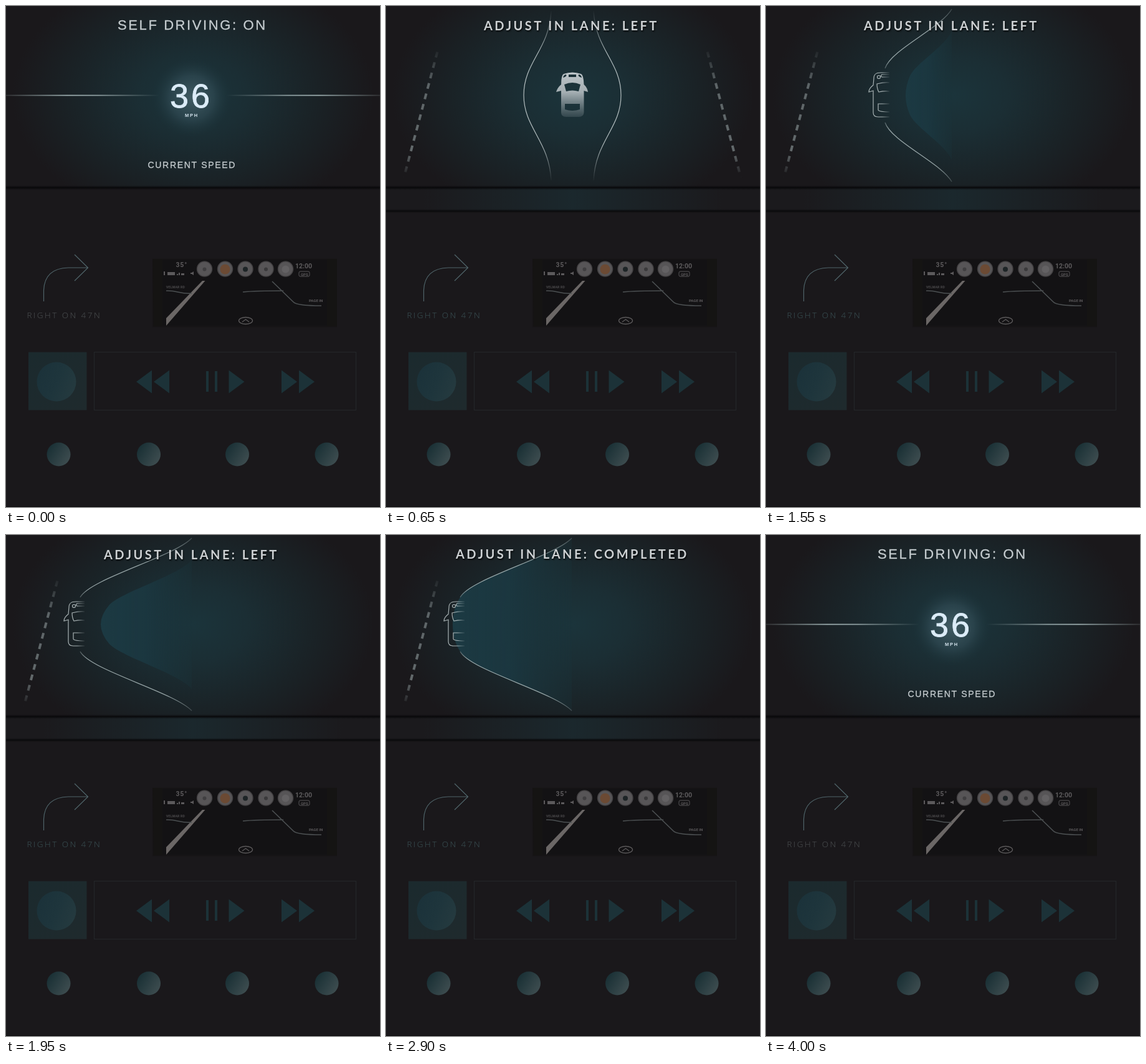
An HTML page for the animation above (4.05 s loop, 600 by 804 pixels).

```html
<!DOCTYPE html>
<html lang="en">
<head>
<meta charset="utf-8">
<title>Dashboard</title>
<style>
html, body { margin: 0; width: 100%; height: 100%; overflow: hidden; background: #1a181b; }
svg { display: block; width: 100vw; height: 100vh; }
.sans { font-family: "Liberation Sans", Arial, sans-serif; fill: #c6cdd0; stroke: #c6cdd0; stroke-width: .3; }
.title { font: 700 20px Lato, sans-serif; letter-spacing: 3.45px; fill: #cdd1d3; filter: drop-shadow(1px 2px 1px #000b); }
.turn { font: 300 13.5px "Open Sans", sans-serif; letter-spacing: 2.45px; }
.tiny { font-family: Roboto, sans-serif; font-weight: 700; fill: #5c5a5c; }
.line { fill: none; }
</style>
</head>
<body>
<svg viewBox="0 0 600 804">
  <defs>
    <radialGradient id="panel" gradientUnits="userSpaceOnUse" cx="0" cy="0" r="1" gradientTransform="translate(300 143) scale(290 205)">
      <stop offset="0" stop-color="#1b343b"/>
      <stop offset=".3" stop-color="#1b2e34"/>
      <stop offset=".65" stop-color="#1a2327"/>
      <stop offset="1" stop-color="#1a181b"/>
    </radialGradient>
    <radialGradient id="glow">
      <stop offset="0" stop-color="#48636b" stop-opacity=".85"/>
      <stop offset=".55" stop-color="#35505a" stop-opacity=".55"/>
      <stop offset="1" stop-color="#1b343b" stop-opacity="0"/>
    </radialGradient>
    <linearGradient id="beam">
      <stop offset="0" stop-color="#b9cccd" stop-opacity=".15"/>
      <stop offset=".4" stop-color="#b9cccd" stop-opacity=".85"/>
      <stop offset=".6" stop-color="#b9cccd" stop-opacity=".75"/>
      <stop offset="1" stop-color="#b9cccd" stop-opacity="0"/>
    </linearGradient>
    <linearGradient id="strip">
      <stop offset=".1" stop-color="#1b1a1d"/>
      <stop offset=".5" stop-color="#1b282d"/>
      <stop offset=".9" stop-color="#1b1a1d"/>
    </linearGradient>
    <linearGradient id="seam" x2="0" y2="1">
      <stop offset="0" stop-color="#08080a" stop-opacity="0"/>
      <stop offset=".5" stop-color="#08080a" stop-opacity=".9"/>
      <stop offset="1" stop-color="#08080a" stop-opacity="0"/>
    </linearGradient>
    <linearGradient id="dashes" gradientUnits="userSpaceOnUse" x1="0" y1="64" x2="0" y2="276">
      <stop offset="0" stop-color="#757e80" stop-opacity="0"/>
      <stop offset=".3" stop-color="#757e80" stop-opacity=".75"/>
      <stop offset=".8" stop-color="#757e80" stop-opacity=".8"/>
      <stop offset="1" stop-color="#757e80" stop-opacity="0"/>
    </linearGradient>
    <linearGradient id="bottle" gradientUnits="userSpaceOnUse" x1="0" y1="6" x2="0" y2="282">
      <stop offset="0" stop-color="#c3cdce" stop-opacity="0"/>
      <stop offset=".25" stop-color="#c3cdce" stop-opacity=".9"/>
      <stop offset=".78" stop-color="#c3cdce" stop-opacity=".9"/>
      <stop offset="1" stop-color="#c3cdce" stop-opacity="0"/>
    </linearGradient>
    <linearGradient id="sweep" gradientUnits="userSpaceOnUse" x1="0" y1="3" x2="0" y2="284">
      <stop offset="0" stop-color="#b5c4c5" stop-opacity=".2"/>
      <stop offset=".13" stop-color="#b5c4c5" stop-opacity=".8"/>
      <stop offset=".3" stop-color="#b5c4c5" stop-opacity=".8"/>
      <stop offset=".35" stop-color="#b5c4c5" stop-opacity=".3"/>
      <stop offset=".65" stop-color="#b5c4c5" stop-opacity=".3"/>
      <stop offset=".7" stop-color="#b5c4c5" stop-opacity=".8"/>
      <stop offset=".9" stop-color="#b5c4c5" stop-opacity=".8"/>
      <stop offset="1" stop-color="#b5c4c5" stop-opacity=".2"/>
    </linearGradient>
    <linearGradient id="body" gradientUnits="userSpaceOnUse" x1="0" y1="106" x2="0" y2="179">
      <stop offset="0" stop-color="#bcc4c8"/>
      <stop offset=".45" stop-color="#a4aeb2"/>
      <stop offset="1" stop-color="#8b989d" stop-opacity=".2"/>
    </linearGradient>
    <linearGradient id="edge" gradientUnits="userSpaceOnUse" x1="273" y1="0" x2="308" y2="0">
      <stop offset=".6" stop-color="#c3cdce" stop-opacity=".85"/>
      <stop offset="1" stop-color="#c3cdce" stop-opacity="0"/>
    </linearGradient>
    <linearGradient id="fill">
      <stop offset="0" stop-color="#1c3a43"/>
      <stop offset=".5" stop-color="#1b3740" stop-opacity=".95"/>
      <stop offset="1" stop-color="#1b343b" stop-opacity=".3"/>
    </linearGradient>
    <linearGradient id="knob" x1=".1" y1=".25" x2=".95" y2=".8">
      <stop offset="0" stop-color="#1b3136"/>
      <stop offset="1" stop-color="#3e4d50"/>
    </linearGradient>
    <linearGradient id="cover" x2="1" y2="1">
      <stop offset="0" stop-color="#1b2a2e"/>
      <stop offset="1" stop-color="#1f2a2d"/>
    </linearGradient>
    <linearGradient id="disc" y1=".3" x2="1" y2=".7">
      <stop offset="0" stop-color="#1b323a"/>
      <stop offset=".5" stop-color="#1e353c"/>
      <stop offset="1" stop-color="#253a3f"/>
    </linearGradient>
  </defs>

  <rect width="600" height="804" fill="#1a181b"/>
  <rect width="600" height="291" fill="url(#panel)"/>

  <g id="speed">
    <circle cx="298" cy="147" r="64" fill="url(#glow)"/>
    <rect y="142.6" width="246" height="1.7" fill="url(#beam)"/>
    <rect y="142.6" width="246" height="1.7" fill="url(#beam)" transform="matrix(-1 0 0 1 600 0)"/>
    <g class="sans">
      <text x="179" y="38" font-size="22" letter-spacing="2.6">SELF DRIVING: ON</text>
      <text x="263" y="163" font-size="54" letter-spacing="4" style="fill:#dcecf8;stroke:#dcecf8;stroke-width:.8">36</text>
      <text x="287" y="177.5" font-size="7.5" font-weight="700" letter-spacing="1.8" style="fill:#d3e2ec;stroke:none">MPH</text>
      <text x="227.5" y="259.5" font-size="14" letter-spacing="1.7">CURRENT SPEED</text>
    </g>
  </g>

  <g id="lane">
    <rect y="292" width="600" height="37" fill="url(#strip)"/>
    <rect y="326" width="600" height="6" fill="url(#seam)"/>
    <path id="leftDashes" class="line" d="M28 278L85.5 62" stroke="url(#dashes)" stroke-width="4" stroke-dasharray="9.3 8" stroke-dashoffset="5.4"/>
    <g id="both">
      <use href="#leftDashes" transform="matrix(-1 0 0 1 598 0)"/>
      <path id="side" class="line" d="M265 8C262 70 221 90 221 143S262 216 265 280" stroke="url(#bottle)" stroke-width="1.2"/>
      <use href="#side" transform="matrix(-1 0 0 1 598 0)"/>
      <path fill="url(#body)" fill-rule="evenodd" d="M285 109Q299 104 313 109Q317 111 317.5 126Q323 131 324 138L317.5 136V171Q317 178 309 178H289Q281 178 281 171V136L273 138Q275 131 281 126Q281 111 285 109Z
        M286 126Q299 120 312 126L309 137Q299 134 289 137Z
        M287 157H311V166Q299 170 287 166Z
        M284 115Q285 110 289 110Q291 113 284 115Z M314 115Q313 110 309 110Q307 113 314 115Z
        M293 110H305V114H293Z"/>
    </g>
    <g id="half">
      <path id="blob" fill="url(#fill)"/>
      <path id="curve" class="line" stroke="url(#sweep)" stroke-width="1.3"/>
      <path id="car" class="line" stroke="url(#edge)" stroke-width="1.2" d="M306 107H292C285 107 281 109 281 116L280 127C276 130 273 134 273 138L280 136V171C280 176 283 178 288 178H306
        M306 110H294Q291 112 294 114H306
        M291.5 114A2.5 2.5 0 1 1 286.500 114A2.5 2.5 0 1 1 291.5 114
        M306 123C298 122 290 124 286 125Q286 133 289 138Q298 136 306 137
        M306 157H288V167Q290 170 306 170"/>
    </g>
    <text id="toLeft" class="title" x="157" y="39">ADJUST IN LANE: LEFT</text>
    <text id="done" class="title" x="112" y="38">ADJUST IN LANE: COMPLETED</text>
  </g>
  <rect y="288" width="600" height="7" fill="url(#seam)"/>

  <path class="line" stroke="#50656a" stroke-width="1.2" d="M60.5 474V456Q62 421 100 420H131M110 399L131.5 420L110 441"/>
  <text id="turn" class="turn" x="33.5" y="501">RIGHT ON 47N</text>

  <g id="map">
    <rect x="235" y="405.5" width="296" height="110" fill="#161416"/>
    <rect x="251" y="407" width="264" height="106" fill="#131214"/>
    <path d="M235 406H251V514H237ZM515 406H531V514H515Z" fill="#151413"/>
    <path d="M257 513V501L315 441H319.5Z" fill="#6b6766"/>
    <path class="line" stroke="#4c5052" stroke-width="1.6" d="M257 457C275 456 280 463 298 461M380 459Q400 457 445 457M427 442L461 475Q466 481 506 481"/>
    <g class="tiny">
      <text x="272.5" y="419" font-size="10.5" letter-spacing=".8">35°</text>
      <text x="464" y="421" font-size="10.5">12:00</text>
      <text x="257" y="453" font-size="5" letter-spacing=".3" opacity=".8">VELMAR RD</text>
      <text x="486" y="475" font-size="6">PAGE IN</text>
      <text x="473" y="432.5" font-size="6">GPS</text>
      <path d="M253 426h2v6h-2zM259 427h12v5h-12zM274 430h2v2h-2zM277 428h2v4h-2zM281 429h5v3h-5zM296 428h2l3-2v6l-3-2h-2z"/>
    </g>
    <rect class="line" x="470" y="426" width="17" height="8" rx="2" stroke="#565456"/>
    <g class="line" stroke="#5c5a5b" stroke-width="1.3"><ellipse cx="384.5" cy="505" rx="11" ry="5.5"/><path d="M379 507L384.5 503L390 507"/></g>
    <g id="icons" stroke-width="1.5"></g>
  </g>

  <rect x="36" y="555.5" width="93.5" height="93" fill="url(#cover)"/>
  <circle cx="81" cy="603" r="31.5" fill="url(#disc)"/>
  <rect class="line" x="141.5" y="555.5" width="420" height="93" stroke="#24272a"/>
  <path fill="#1c3238" d="M209 603L234 584.5V621.5ZM237 603L262 584.5V621.5ZM321 586h4v33h-4zM335 586h4v33h-4zM357.5 584.5L382.5 603L357.5 621.5ZM442 584.5L467 603L442 621.5ZM470 584.5L495 603L470 621.5Z"/>
  <g id="knobs" fill="url(#knob)"></g>
  <rect y="803" width="600" height="1" fill="#0c0b0d"/>
</svg>
<script>
const LOOP = 4050, STEP = 50, TIP = 298, MID = 143.5;
const el = id => document.getElementById(id);
const ramp = (t, from, to) => Math.min(1, Math.max(0, (t - from) / (to - from)));
const mix = (a, b, p) => a + (b - a) * p;
const fade = (id, value) => el(id).setAttribute('opacity', value);
const same = y => y, flip = y => 2 * MID - y;

const icons = [
  { x: 318.5, r: 3, fill: '#403f41' },
  { x: 351.5, r: 8, fill: '#6b4a34' },
  { x: 384, r: 4, fill: '#1d2426' },
  { x: 417, r: 3, fill: '#3a393b' },
  { x: 448.5, r: 6, fill: '#636163' },
];
el('icons').innerHTML = icons.map(({ x, r, fill }) =>
  `<circle cx="${x}" cy="422" r="12" fill="#575557" stroke="#434143"/>
   <circle cx="${x}" cy="422.5" r="${r}" fill="${fill}"/>`).join('');
el('knobs').innerHTML = [84.5, 229, 371, 514.5].map(x => `<circle cx="${x}" cy="719.5" r="19"/>`).join('');

// One side of the swept lane, from the tip down to x = end; side mirrors it vertically.
function arm(end, side, [y0, y1, y2, y3], bend) {
  const at = k => mix(TIP, end, k);
  return `${TIP} ${side(y0)}C${at(.16)} ${side(y1)} ${at(bend)} ${side(y2)} ${end} ${side(y3)}`;
}

const OUTER = [5, 35, 70, 100], INNER = [40, 65, 90, 112];

const curvePath = centre =>
  'M' + arm(centre, same, OUTER, .91) + 'M' + arm(centre, flip, OUTER, .91);

function blobPath(centre, full) {
  const peak = Math.min(TIP, mix(centre + 33, centre - 12, full));
  const join = mix(mix(TIP, peak, .905), centre, full);
  const ys = INNER.map((y, i) => mix(y, OUTER[i], full));
  const bend = mix(.83, .91, full);
  const bulge = side => `Q${peak} ${side(mix(128, 118, full))} ${peak} ${MID}`;
  return ['M', same, 'M', flip].reduce((d, part) =>
    typeof part === 'string' ? d + part : d + arm(join, part, ys, bend) + bulge(part) + `H${TIP}Z`, '');
}

function draw(t) {
  const shown = t < 3150 ? ramp(t, 0, 600) : 0;
  fade('speed', 1 - shown);
  fade('lane', shown);
  el('turn').setAttribute('fill', `rgb(${mix(78, 60, shown)} ${mix(82, 84, shown)} ${mix(84, 88, shown)})`);

  const split = ramp(t, 650, 1050);
  fade('both', 1 - split);
  fade('half', split);

  const centre = 299 - 120 * ramp(t, 650, 1650) - 60 * ramp(t, 1650, 1850);
  const full = ramp(t, 2150, 2600);
  el('car').setAttribute('transform', `translate(${centre - 299})`);
  el('curve').setAttribute('d', curvePath(centre));
  el('blob').setAttribute('d', blobPath(centre, full));

  fade('toLeft', 1 - full);
  fade('done', full);
}

function tick(now) {
  draw(Math.floor(now % LOOP / STEP) * STEP);
  requestAnimationFrame(tick);
}
draw(0);
requestAnimationFrame(tick);
</script>
</body>
</html>
```
